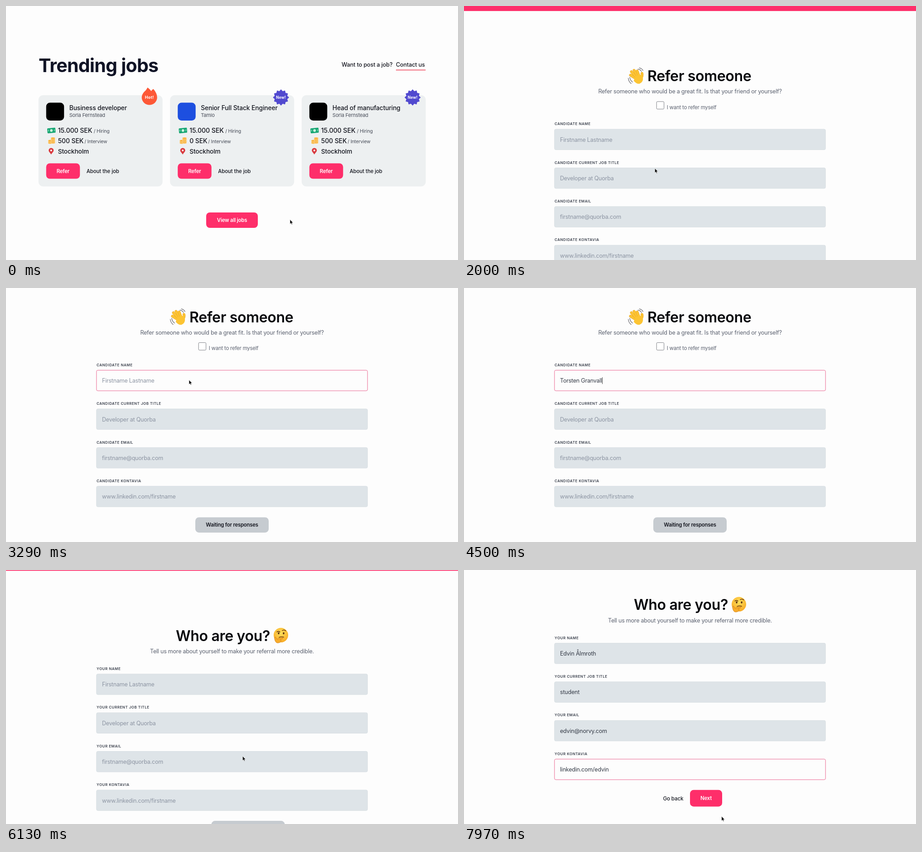
An HTML page for the animation above (8 s loop, 998 px wide and 561 px high).

```html
<!DOCTYPE html>
<html lang="en">
<head>
<meta charset="utf-8">
<title>Refer a candidate</title>
<style>
  html, body { margin: 0; width: 100%; height: 100%; overflow: hidden; background: #fdfdfd; }
  svg { display: block; width: 100%; height: 100%; }
  text { font-family: Inter, "Liberation Sans", sans-serif; font-optical-sizing: none; letter-spacing: -.017em; white-space: pre; }
  text[font-weight="500"] { letter-spacing: -.007em; }
  text.label { letter-spacing: .51px; }
  text.title { letter-spacing: -.01em; }
</style>
</head>
<body>
<svg id="stage" viewBox="0 0 998 561" xmlns="http://www.w3.org/2000/svg"></svg>
<script>
const LOOP = 8000, PINK = '#fe2e6a', INK = '#14161f', GREY = '#5c6270';
const LANDING_END = 1080, REFER_END = 5930;

const text = (x, y, str, size, weight = 400, fill = INK, attrs = '') =>
  `<text x="${x}" y="${y}" font-size="${size}" font-weight="${weight}" fill="${fill}" ${attrs}>${str}</text>`;
const mid = (x, y, str, size, weight, fill, attrs = '') =>
  text(x, y, str, size, weight, fill, `text-anchor="middle" ${attrs}`);
const box = (x, y, w, h, r, fill, attrs = '') =>
  `<rect x="${x}" y="${y}" width="${w}" height="${h}" rx="${r}" fill="${fill}" ${attrs}/>`;
const group = (x, y, body, attrs = '') => `<g transform="translate(${x} ${y})" ${attrs}>${body}</g>`;
const path = (d, attrs) => `<path d="${d}" ${attrs}/>`;
const button = (x, y, w, h, label, size = 11.4, fill = PINK, ink = '#fff') =>
  box(x, y, w, h, 8, fill) + mid(x + w / 2, y + h / 2 + 4.2, label, size, 600, ink);

// Icons
const cash = box(0, 2, 18, 11, 1.5, '#17a673', 'transform="rotate(-5 9 7)"') +
  '<circle cx="9" cy="7.5" r="3" fill="#c9f2dd"/>' +
  path('M2.5 5.5v4M15.5 5v4', 'stroke="#8be0b8" stroke-width="1.5"');

const coin = (x, y) => `<ellipse cx="${x}" cy="${y}" rx="4.8" ry="1.9" fill="#f8a928" stroke="#fdecc4" stroke-width=".8"/>`;
const coins = [12, 9.5, 7].map(y => coin(5, y)).join('') +
  [11.5, 9, 6.5, 4, 1.5].map(y => coin(11, y)).join('');

const pin = path('M6 14.5C3.5 10.5 .5 8 .5 5.5a5.5 5.5 0 0 1 11 0C11.5 8 8.5 10.5 6 14.5z', 'fill="#d93a3f"') +
  '<circle cx="6" cy="5.5" r="2" fill="#fff"/>';

const fingers = ['M19 24L5.5 15.5', 'M20 22L7.5 8.5', 'M22 20L13 5.5', 'M24 19L19.5 7', 'M27 23Q31 17 29.5 12'];
const hand = fingers.map(d =>
    path(d, 'stroke="#e8a020" stroke-width="5.6"') + path(d, 'stroke="#fcc433" stroke-width="4.5"')).join('') +
  path('M17 19L25 16L30 21Q31 29 24 32Q19 33 14 27z', 'fill="#fcc433" stroke="#fcc433" stroke-width="3"') +
  path('M21 3Q27 4 28.5 8M24 .5Q30 2 31.5 6M4 20Q5 27 10 30M1 22Q2 30 7 33', 'stroke="#6b6b70" stroke-width="1.2"');
const wave = (x, y, k) =>
  `<g transform="translate(${x} ${y}) scale(${k})" fill="none" stroke-linecap="round" stroke-linejoin="round">${hand}</g>`;

const thinker = '<circle r="16" fill="url(#skin)"/>' +
  '<ellipse cx="-5" cy="-4" rx="1.8" ry="2.4" fill="#5a3414"/><ellipse cx="6" cy="-4" rx="1.8" ry="2.4" fill="#5a3414"/>' +
  path('M-9 -7Q-5.5 -9.5 -2 -7M3 -10Q7 -13 10.5 -9.5M-4 5Q1 2.5 6 4.5', 'fill="none" stroke="#6b3c12" stroke-width="1.6" stroke-linecap="round"') +
  path('M-14 8Q-15 4 -12 4L-9 9L3 5.5Q6 6 4 8L-2 10Q2 11 0 14Q-3 18 -9 17Q-13 15 -14 8z', 'fill="#f7ac2b" stroke="#d5831c" stroke-width=".9"');

// Badges
const star = Array.from({ length: 24 }, (_, i) => {
  const a = i * Math.PI / 12, r = i % 2 ? 13.6 : 17;
  return `${(r * Math.sin(a)).toFixed(1)},${(-r * Math.cos(a)).toFixed(1)}`;
}).join(' ');
const fresh = `<polygon points="${star}" fill="#5149cf" stroke="#5149cf" stroke-width="1.2" stroke-linejoin="round"/>` +
  mid(0, 3, 'New!', 8.3, 700, '#fff', 'style="letter-spacing:.02em"');
const hot = path('M-4 -22Q0 -19 4 -14Q6 -18 9 -18.5Q17 -9 17 0A17 16.5 0 0 1 -17 0Q-17 -6 -12 -12Q-7 -16 -4 -22z', 'fill="#fd5837"') +
  mid(0, 3.4, 'Hot!', 9, 700, '#fff', 'style="letter-spacing:.03em"');

// Landing page
function card(x, role, firm, logo, fee, feeEnd, badge) {
  const note = (dx, y, s) => text(dx, y, s, 10.5, 400, '#474c58');
  return group(x, 0,
    box(0, 197, 274, 201.5, 10, '#edf0f1') +
    box(17, 213.5, 39.5, 39.5, 8.5, logo) +
    text(68, 230, role, 13.8, 500) + text(68, 244.7, firm, 11, 400, '#474c58') +
    group(19.5, 267.5, cash) + text(43, 280, '15.000 SEK', 14.2, 500) + note(122, 280, '/ Hiring') +
    group(21, 290.5, coins) + text(43, 302.7, fee, 14, 500) + note(feeEnd, 302.7, '/ Interview') +
    group(22, 313.5, pin) + text(43, 325.6, 'Stockholm', 13.7, 500) +
    button(17, 347.5, 74.5, 34, 'Refer') + text(106, 369, 'About the job', 11.4, 500) +
    group(245, 202, badge));
}
const landing =
  text(72, 145.5, 'Trending jobs', 41, 700, '#111426', 'style="letter-spacing:-.018em"') +
  text(741, 133.7, 'Want to post a job?', 12.5, 500) + text(861, 133.7, 'Contact us', 12.5, 500) +
  box(861, 140.6, 65.5, 1.6, 0, '#ee4a5e') +
  card(71.7, 'Business developer', 'Sorla Fernstead', '#000', '500 SEK', 101.5, hot) +
  card(362.2, 'Senior Full Stack Engineer', 'Tamlo', '#1d4fe0', '0 SEK', 84, fresh) +
  card(652.8, 'Head of manufacturing', 'Sorla Fernstead', '#000', '500 SEK', 101.5, fresh) +
  button(442, 456, 114, 34, 'View all jobs');

// Form pages
const nav = box(0, 0, 998, 34.3, 0, '#4338dc') + wave(340, 11, .35) +
  text(353.5, 21.5, 'Greetings! We just posted our first jobs!', 11, 600, '#fff') +
  text(566.5, 21.5, 'See open positions', 11, 600, '#fff', 'text-decoration="underline"') +
  box(0, 34, 998, 68.2, 0, PINK) + '<circle cx="43" cy="68.5" r="14.5" fill="#fff"/>' +
  text(69, 75, 'Hulvo', 19.8, 500, '#fff') +
  [['How it works', 147], ['Job board', 261], ['Companies', 347], ['About us', 440.5]]
    .map(([s, x]) => text(x, 74, s, 12.5, 600, '#fff')).join('') +
  path('M231 67.5l4.7 4.7l4.7 -4.7', 'fill="none" stroke="#fff" stroke-width="2" stroke-linecap="round"') +
  box(843.5, 51, 126, 37.5, 7, '#fff') + mid(906.5, 74, 'Post a job', 12.5, 600, PINK);

const HINTS = ['Firstname Lastname', 'Developer at Quorba', 'firstname@quorba.com', 'www.linkedin.com/firstname'];
const LABELS = ['NAME', 'CURRENT JOB TITLE', 'EMAIL', 'KONTAVIA'];
const PITCH = 85.4, FIELD_H = 45.4;
// times: focus, typing start, typing end for each field
const forms = [
  { id: 'refer', who: 'CANDIDATE', top: 363.2, button: [688, 33.8], back: false,
    values: ['Torsten Granvall', 'developer', 'torsten@norvy.com', 'linkedin.com/torsten'],
    times: [[3020, 3560, 4440], [4600, 4660, 4900], [4960, 5010, 5290], [5340, 5390, 5640]] },
  { id: 'you', who: 'YOUR', top: 330.3, button: [654.6, 36.6], back: true,
    values: ['Edvin Ålmroth', 'student', 'edvin@norvy.com', 'linkedin.com/edvin'],
    times: [[6460, 6580, 6790], [6830, 6870, 7010], [7050, 7130, 7390], [7420, 7460, 7700]] }
];

function formMarkup(f) {
  const rows = LABELS.map((label, i) => group(0, f.top + i * PITCH,
    text(200, -8.9, `${f.who} ${label}`, 8, 600, '#3b414d', 'class="label"') +
    box(199.8, 0, 598.4, FIELD_H, 3, '#dee4e8', `id="${f.id}Box${i}"`) +
    text(212, 27.6, '', 12.5, 400, '', `id="${f.id}Text${i}"`))).join('');
  const [y, h] = f.button, shift = f.back ? 35.5 : 0, base = y + h / 2 + 5;
  const back = x => f.back ? text(x, base, 'Go back', 11.5, 500) : '';
  return rows +
    `<g id="${f.id}Wait">${button(418 + shift, y, 162, h, 'Waiting for responses', 11.3, '#c6cbd0', INK)}${back(393)}</g>` +
    `<g id="${f.id}Next">${button(463.5 + shift, y, 71, h, 'Next')}${back(439.5)}</g>` +
    box(0, 0, .9, 15, 0, '#333', `id="${f.id}Caret"`);
}
const refer = nav + wave(361.7, 227.3, 1.06) +
  text(405, 257.6, 'Refer someone', 32, 600, '#07080c', 'class="title"') +
  mid(499, 284.6, 'Refer someone who would be a great fit. Is that your friend or yourself?', 12.5, 400, GREY) +
  box(425.2, 302.2, 16.4, 16.6, 2, '#fff', 'stroke="#7d7f86"') +
  text(447.7, 318.8, 'I want to refer myself', 11.4, 400, GREY) + formMarkup(forms[0]);
const you = nav + text(375, 257.3, 'Who are you?', 32, 600, '#07080c', 'class="title"') +
  group(607, 244.4, thinker) +
  mid(499, 284.4, 'Tell us more about yourself to make your referral more credible.', 12.5, 400, GREY) +
  formMarkup(forms[1]);

const status = box(-6, 546, 266, 20, 4, '#85898d', 'fill-opacity=".88"') +
  text(255, 556.8, 'ps://www.joinhulvo.com/refer/tamlo/senior-full-stack-engineer', 8.8, 400, '#fff', 'text-anchor="end"');
const arrow = path('M0 0V11.2L2.5 8.9L4.2 12.6L6 11.8L4.4 8.2H7.8z',
  'fill="#0a0a0a" stroke="#fff" stroke-width=".8" stroke-linejoin="round" transform="scale(.9)"');

document.getElementById('stage').innerHTML =
  '<defs><radialGradient id="skin" cx=".5" cy=".35" r=".7"><stop offset="0" stop-color="#ffe05c"/><stop offset="1" stop-color="#f7a51f"/></radialGradient></defs>' +
  `<g id="landing">${landing}</g><g id="refer">${refer}</g><g id="you">${you}</g>` +
  `<g id="status">${status}</g><g id="mouse">${arrow}</g>`;

const $ = id => document.getElementById(id);
const show = (id, on) => $(id).setAttribute('visibility', on ? 'inherit' : 'hidden');
const clamp = v => Math.max(0, Math.min(1, v));
const ramp = (t, a, b) => clamp((t - a) / (b - a));
const easeOut = u => 1 - (1 - u) ** 2;
const easeInOut = u => u * u * (3 - 2 * u);

// Pointer stops: time, x, y
const stops = [[120, 627, 471.5], [720, 418, 361], [860, 421.5, 357.5], [1900, 421.5, 357.5], [2340, 420, 365],
  [2640, 420, 365], [2980, 404, 203], [5660, 404, 203], [5840, 503, 519], [5950, 503, 519], [6130, 522.3, 411],
  [6290, 522.3, 411], [6440, 500, 184], [7800, 500, 184], [7970, 568.7, 544]];
function pointer(t) {
  const i = stops.findIndex(s => s[0] > t);
  if (i <= 0) return (i ? stops[stops.length - 1] : stops[0]).slice(1);
  const [a, x, y] = stops[i - 1], [b, x2, y2] = stops[i], u = easeInOut(ramp(t, a, b));
  return [x + (x2 - x) * u, y + (y2 - y) * u];
}

function drawForm(f, t) {
  show(f.id + 'Caret', false);
  f.times.forEach(([focus, from, to], i) => {
    const next = f.times[i + 1];
    const active = t >= focus && (!next || t < next[0]);
    const typed = f.values[i].slice(0, Math.ceil(f.values[i].length * ramp(t, from, to)));
    const label = $(f.id + 'Text' + i), frame = $(f.id + 'Box' + i);
    label.textContent = typed || HINTS[i];
    label.setAttribute('fill', typed ? '#343a46' : '#8c94a2');
    frame.setAttribute('fill', active ? '#fdfdfd' : '#dee4e8');
    frame.setAttribute('stroke', active ? '#ea6490' : '#d8dfe3');
    if (!active) return;
    const idle = t - (t < from ? focus : Math.min(t, to));
    const caret = $(f.id + 'Caret');
    caret.setAttribute('x', 212 + (typed ? label.getComputedTextLength() : 0));
    caret.setAttribute('y', f.top + i * PITCH + 15.5);
    show(caret.id, idle % 400 < 200);
  });
  const done = t >= f.times[3][2];
  show(f.id + 'Wait', !done);
  show(f.id + 'Next', done);
}

function draw(t) {
  const page = t < LANDING_END ? 'landing' : t < REFER_END ? 'refer' : 'you';
  for (const id of ['landing', 'refer', 'you']) $(id).style.display = id === page ? '' : 'none';
  const scroll = page === 'refer' ? 181.6 * easeOut(ramp(t, 1750, 2600))
    : page === 'you' ? 168.8 * easeOut(ramp(t, 5980, 6392)) : 0;
  $(page).setAttribute('transform', `translate(0 ${-scroll})`);
  if (page === 'refer') drawForm(forms[0], t);
  if (page === 'you') drawForm(forms[1], t);
  $('status').setAttribute('opacity', ramp(t, 680, 780) * (1 - ramp(t, 1500, 1700)));
  const hidden = (t > 3540 && t < 5660) || (t > 6560 && t < 7820);
  show('mouse', !hidden);
  $('mouse').setAttribute('transform', `translate(${pointer(t).join(' ')})`);
}

let start;
function tick(now) {
  start ??= now;
  draw((now - start) % LOOP);
  requestAnimationFrame(tick);
}
draw(0);
requestAnimationFrame(tick);
</script>
</body>
</html>
```
